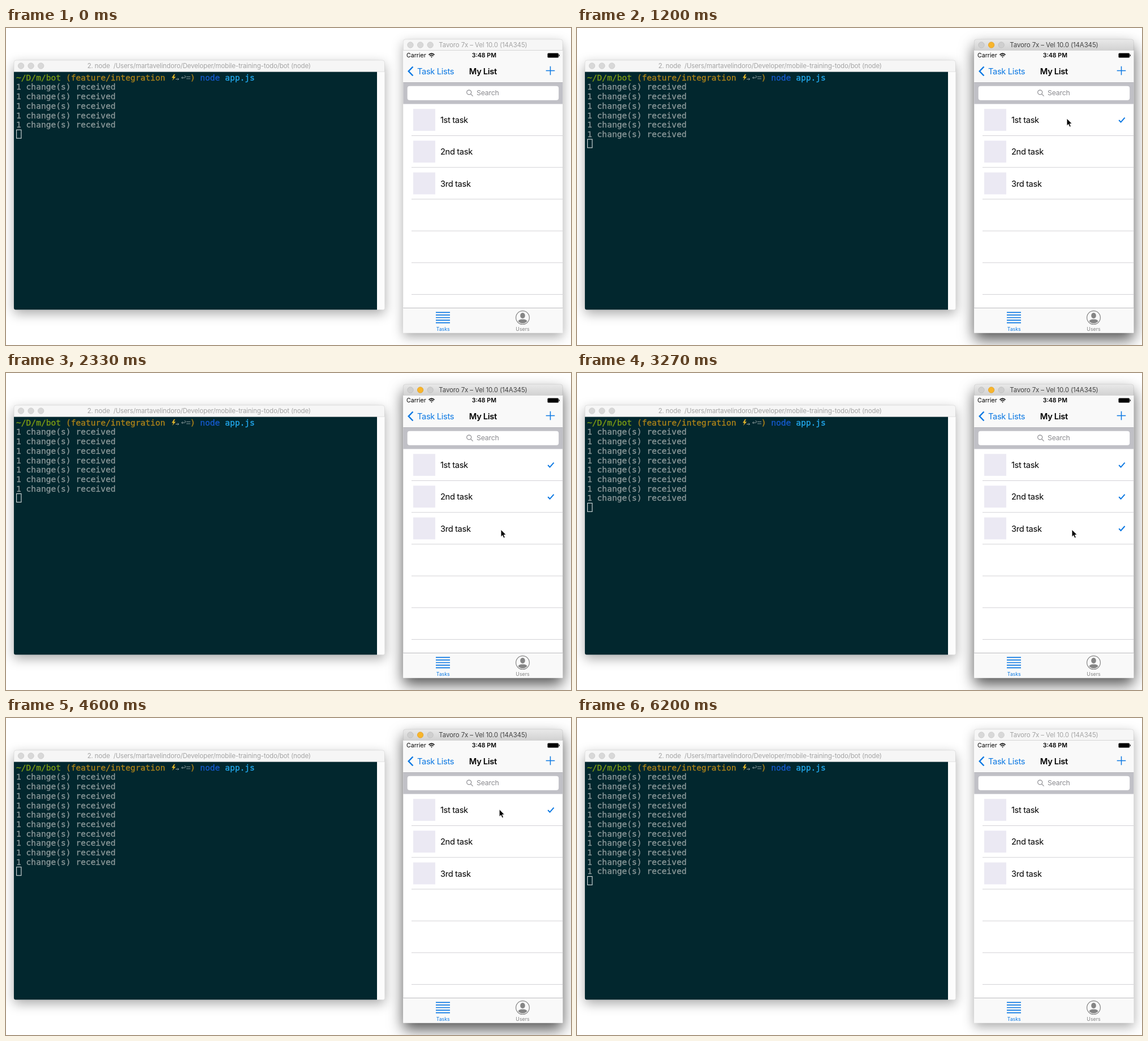
An HTML page that plays this animation: 999 px wide and 561 px high, repeating every 6270 ms.

```html
<!DOCTYPE html>
<html lang="en">
<head>
<meta charset="utf-8">
<title>Todo list and bot</title>
<style>
  html, body { margin: 0; width: 100%; height: 100%; overflow: hidden; background: #fff; }
  svg { display: block; width: 999px; height: 561px; }
  text { font: 14.7px Inter, sans-serif; letter-spacing: -.024em; white-space: pre; }
  .title { font-size: 11.5px; letter-spacing: -.012em; text-anchor: middle; fill: #a4a4a4; }
  .status { font-size: 10.6px; letter-spacing: 0; }
  .tab { font-size: 8.8px; letter-spacing: 0; text-anchor: middle; }
  .mono text { font: 14.6px "DejaVu Sans Mono", monospace; letter-spacing: 0; stroke-width: .35px; }
  .window { fill: #f6f6f6; stroke: #0002; stroke-width: .6px; filter: drop-shadow(0 7px 10px #0005); }
  .light { fill: #d8d8d8; stroke: #c6c6c6; stroke-width: .7px; }
  .blue { stroke: #0b78e3; fill: none; }
  .active .window { fill: url(#bar); filter: drop-shadow(0 12px 13px #000a); }
  .active .title { fill: #444; }
  .active .light { fill: #cfcfcf; stroke: #bababa; }
  .active .middle { fill: #f8b52c; stroke: #dc9a1d; }
</style>
</head>
<body>
<svg viewBox="0 0 999 561">
  <defs>
    <linearGradient id="bar" gradientUnits="userSpaceOnUse" x1="0" y1="20" x2="0" y2="40">
      <stop stop-color="#e9e9e9"/><stop offset="1" stop-color="#d1d1d1"/>
    </linearGradient>
  </defs>

  <g id="terminal">
    <rect class="window" x="14" y="57" width="655.5" height="441.5" rx="4"/>
    <path d="M14 77.5H656V498.5H17q-3 0-3-3z" fill="#02272e"/>
    <path d="M656 77.5H669.5V495.5q0 3-3 3H656z" fill="#fcfcfc"/>
    <path d="M14 77.2H669.5" stroke="#d4d4d4" stroke-width=".6"/>
    <text class="title" x="341.3" y="71.2">2. node  /Users/martavelindoro/Developer/mobile-training-todo/bot (node)</text>
    <g class="mono">
      <g id="prompt"></g>
      <path d="M297 82l-4 6.300h3l-2 5 6-7h-3.500l2.500-4.300z" fill="#e8b92c"/>
      <path d="M300 90.500h5.500m-2-2 2 2-2 2M310.500 88h5q2 0 2-1.700t-2-1.700M312.500 86l-2 2 2 2M319 86.300h7m-7 3.500h7" fill="none" stroke="#8b9a9b"/>
      <g id="log"></g>
      <rect id="caret" x="18.600" width="8.300" height="15" fill="none" stroke="#d8dede" stroke-width="1.100"/>
    </g>
  </g>

  <g id="phone">
    <rect class="window" x="702.300" y="20" width="282" height="519.500" rx="4"/>
    <text class="title" x="843.500" y="34.300">Tavoro 7x – Vel 10.0 (14A345)</text>
    <path d="M702.300 39.500h282v500h-282z" fill="#fff"/>
    <path d="M702.300 39.500h282v57h-282zM702.300 495.500h282v44h-282z" fill="#f9f9f9"/>
    <path d="M702.300 39.500h282" stroke="#c8c8c8" stroke-width=".7"/>
    <path d="M702.300 96.500h282v38h-282z" fill="#c0c0c6"/>
    <path d="M702.300 96.500h282M702.300 495.500h282" stroke="#adadb0" stroke-width=".8"/>

    <text class="status" x="708" y="52.400">Carrier</text>
    <text class="status" x="845.300" y="52.400" text-anchor="middle" font-weight="600" style="font-weight:600">3:48 PM</text>
    <g fill="none" stroke="#000" stroke-width="1.500">
      <path d="M747.500 47.400q5-4.600 10 0M749.300 49.400q3.200-2.800 6.400 0"/>
      <path d="M750.800 50.600L752.500 52.600 754.200 50.600z" fill="#000" stroke="none"/>
    </g>
    <rect x="957.500" y="44.500" width="19.500" height="8" rx="1.500"/>
    <path d="M978.300 47v3" stroke="#000" stroke-width="1.200"/>

    <path class="blue" d="M719.500 68.500L711.800 76.500 719.500 84.500" stroke-width="2.500"/>
    <text x="727" y="81.800" fill="#0b78e3">Task Lists</text>
    <text x="843.300" y="81.800" text-anchor="middle" style="font-weight:600">My List</text>
    <path class="blue" d="M954.700 75.500h15.600M962.500 67.700v15.600" stroke-width="1.500"/>

    <rect x="709.700" y="102.700" width="267.500" height="25" rx="4" fill="#fff"/>
    <g fill="none" stroke="#8a8a8f" stroke-width="1.200"><circle cx="818.700" cy="113.800" r="4"/><path d="M821.600 116.700l4 4"/></g>
    <text x="832" y="119.400" fill="#8a8a8f" style="font-size:12.3px;letter-spacing:-.015em">Search</text>

    <g id="rows"></g>

    <path class="blue" d="M760 503.300h25m-25 4.600h25m-25 4.600h25m-25 4.600h25m-25 4.600h25" stroke-width="1.700"/>
    <text class="tab" x="772.700" y="535.700" fill="#0b78e3">Tasks</text>
    <circle cx="913.500" cy="512.600" r="11.900" fill="none" stroke="#858585" stroke-width="1.200"/>
    <g fill="#858585">
      <ellipse cx="913.500" cy="509" rx="4.300" ry="5"/>
      <path d="M905.500 519q1-2.800 5.500-3.600h5q4.500.8 5.500 3.600-3.500 3.700-8 3.700t-8-3.700z"/>
      <text class="tab" x="913.500" y="535.700">Users</text>
    </g>
  </g>

  <g id="pointer">
    <circle id="ring" cx="0" cy="0" r="18.400" fill="none" stroke="#000" stroke-width="2.900"/>
    <path d="M0 0V13.200L3 10.500 5 15.200 7.400 14.200 5.400 9.600H9.400z" stroke="#fff" stroke-width="1"/>
  </g>
</svg>

<script>
const LOOP = 6270, ROW = 56.2, LINE = 16.7;
const $ = id => document.getElementById(id);

function add(parent, tag, attrs, content = '') {
  const el = document.createElementNS('http://www.w3.org/2000/svg', tag);
  for (const name in attrs) el.setAttribute(name, attrs[name]);
  el.textContent = content;
  return parent.appendChild(el);
}

function addLights(parent, x, y) {
  for (let i = 0; i < 3; i++)
    add(parent, 'circle', { class: i === 1 ? 'light middle' : 'light', cx: x + i * 17.6, cy: y, r: 5.2 });
}
addLights($('terminal'), 26.5, 67);
addLights($('phone'), 715, 30);

const monoText = (parent, column, y, color, content) =>
  add(parent, 'text', { x: 18 + column * 8.79, y, fill: color, stroke: color }, content);

[[0, '#7d9c14', '~/D/m/bot'], [10, '#ad8319', '(feature/integration'], [35, '#ad8319', ')'],
 [37, '#1559cc', 'node'], [42, '#22a9ee', 'app.js']]
  .forEach(([column, color, content]) => monoText($('prompt'), column, 92.7, color, content));

const logLines = Array.from({ length: 11 }, (_, i) =>
  monoText($('log'), 0, 109.4 + i * LINE, '#8b9899', '1 change(s) received'));

const checks = [];
for (let i = 0; i < 6; i++) {
  const y = 134.3 + i * ROW;
  add($('rows'), 'path', { d: `M717 ${y + ROW}H984.3`, stroke: '#c8c7cc', 'stroke-width': .8 });
  if (i > 2) continue;
  add($('rows'), 'rect', { x: 720, y: y + 8.9, width: 39, height: 38.8, fill: '#ebe9f3' });
  add($('rows'), 'text', { x: 768, y: y + 33.9 }, ['1st', '2nd', '3rd'][i] + ' task');
  checks.push(add($('rows'), 'path', { class: 'blue', d: `M958.2 ${y + 28.7}l3.4 3.6 7-8`, 'stroke-width': 2 }));
}

// Each tap toggles one row: [time, row]
const taps = [[720, 0], [1640, 1], [2430, 2], [3290, 2], [4060, 1], [4730, 0]];

// Pointer stops: [time, x, y]
const stops = [
  [70, 822, 575], [640, 868, 154], [800, 868, 155], [1000, 866, 160], [1400, 866, 160],
  [1640, 872, 216], [1830, 872, 217], [2100, 875, 277], [3400, 875, 277], [3900, 878, 220],
  [4220, 878, 220], [4640, 872, 160], [4930, 872, 160], [5270, 819, 282], [5740, 780, 580]
];

function pointerAt(t) {
  const next = stops.findIndex(stop => stop[0] > t);
  if (next < 1) return [0, -50];
  const [t0, x0, y0] = stops[next - 1], [t1, x1, y1] = stops[next];
  const p = (t - t0) / (t1 - t0), ease = p * p * (3 - 2 * p);
  return [x0 + (x1 - x0) * ease, y0 + (y1 - y0) * ease];
}

const show = (el, visible) => el.style.display = visible ? '' : 'none';

function draw(now) {
  const t = now % LOOP;
  const lines = 5 + taps.filter(([time]) => t >= time + 260).length;
  logLines.forEach((el, i) => show(el, i < lines));
  $('caret').setAttribute('y', 96.7 + lines * LINE);
  checks.forEach((el, row) =>
    show(el, taps.filter(tap => tap[1] === row && t >= tap[0] + 130).length % 2));
  $('phone').setAttribute('class', t >= 810 && t < 5900 ? 'active' : '');
  $('pointer').setAttribute('transform', `translate(${pointerAt(t)})`);
  show($('ring'), taps.some(([time]) => t >= time && t < time + 140));
  requestAnimationFrame(draw);
}
requestAnimationFrame(draw);
</script>
</body>
</html>
```
